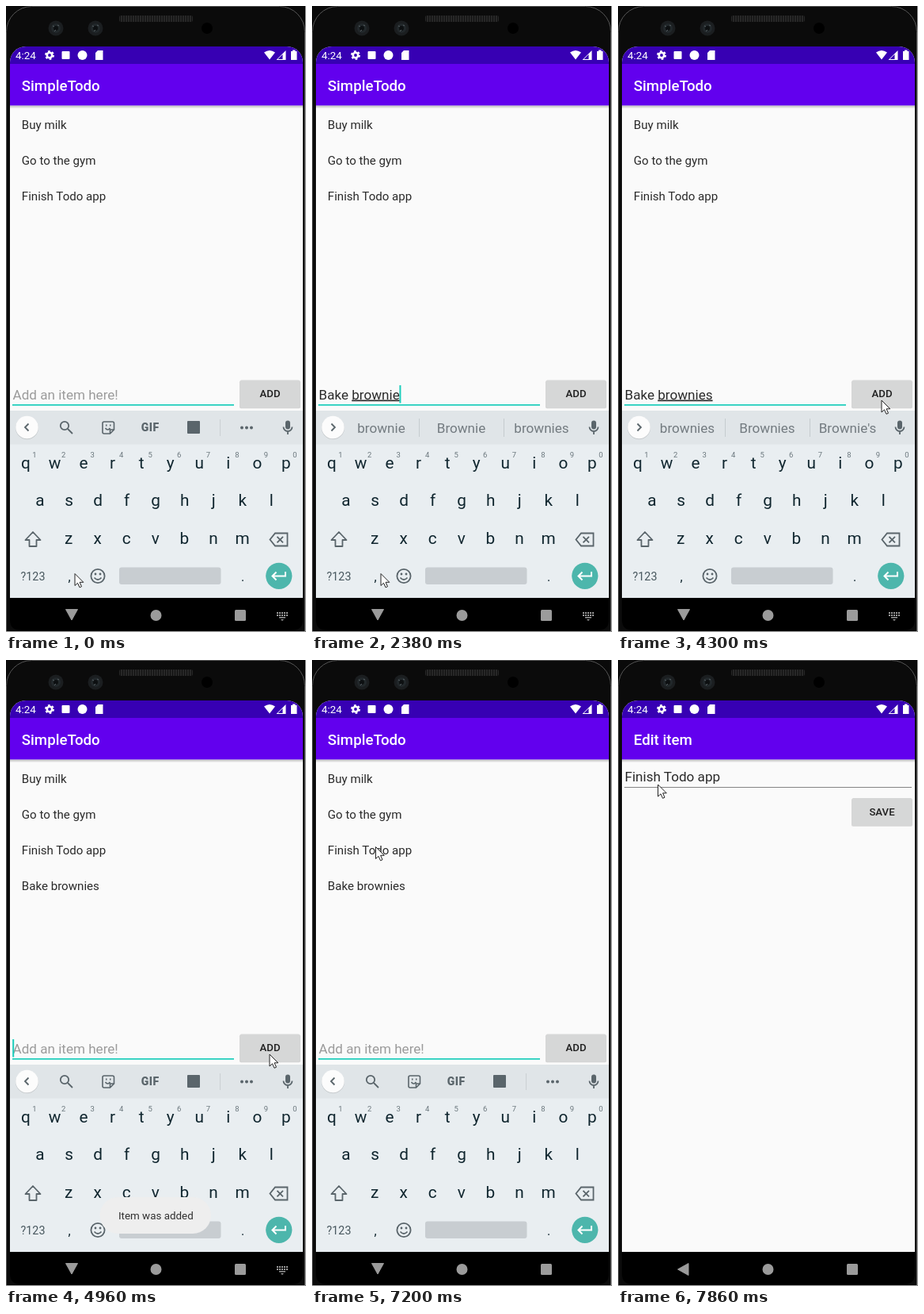
Recreate the animation shown at these times as an HTML page. Size 379 px wide and 789 px high, loop 8000 ms.

```html
<!DOCTYPE html>
<html lang="en">
<head>
<meta charset="utf-8">
<title>Todo app</title>
<style>
  html, body { margin: 0; width: 100%; height: 100%; overflow: hidden; background: #0a0a0a; }
  svg { display: block; width: 379px; height: 789px; font-family: Roboto, "Noto Sans", sans-serif; }
  text { white-space: pre; }
  .mid { text-anchor: middle; }
  .title { font-size: 18.7px; font-weight: 500; fill: #fff; }
  .row { font-size: 15.1px; fill: #2a2a2a; }
  .edit { font-size: 17.1px; fill: #2a2a2a; }
  .btn { font-size: 13.2px; font-weight: 500; fill: #202020; }
  .key { font-size: 20.8px; fill: #10262f; }
  .dot { font-size: 16px; fill: #10262f; }
  .num { font-size: 9.5px; fill: #6b777d; }
  .sug { font-size: 17.1px; fill: #737b80; }
  .sug.bold { font-weight: 700; fill: #101010; }
  .line { fill: none; stroke: #5a656b; stroke-width: 1.8; }
</style>
</head>
<body>
<svg viewBox="0 0 379 789">
  <defs>
    <clipPath id="screen"><path d="M5 746V71A20 20 0 0 1 25 51H355A20 20 0 0 1 375 71V746Z"/></clipPath>
    <linearGradient id="shade" x2="0" y2="1">
      <stop stop-color="#000" stop-opacity=".25"/><stop offset="1" stop-color="#000" stop-opacity="0"/>
    </linearGradient>
    <pattern id="mesh" width="3" height="3" patternUnits="userSpaceOnUse">
      <rect width="3" height="3" fill="#272727"/><rect width="1" height="3" fill="#111"/>
    </pattern>
    <g id="lens">
      <circle r="9.5" fill="#1b1e20"/><circle r="6" fill="#22282b"/>
      <circle r="3" fill="#0d1012"/><path d="M-4-3l2 1M2-4l2 1M-2 4l2-2" stroke="#596165"/>
    </g>
    <g id="bar">
      <rect x="5" y="125.4" width="370" height="4" fill="url(#shade)"/>
      <rect x="5" y="73" width="370" height="52.4" fill="#6200ee"/>
    </g>
    <g id="button">
      <rect x="295" y=".8" width="77" height="35" rx="2" fill="#000" opacity=".15"/>
      <rect x="295.5" width="76" height="34.5" rx="2" fill="#d6d7d7"/>
    </g>
  </defs>

  <!-- device -->
  <rect width="379" height="789" fill="#0a0a0a"/>
  <rect x=".5" y=".5" width="377" height="830" rx="32" fill="#0b0b0b" stroke="#555"/>
  <path d="M378.5 0V788.5H0" fill="none" stroke="#a8a8a8"/>
  <rect x="143" y="12" width="93" height="8" rx="2" fill="url(#mesh)"/>
  <use href="#lens" x="63" y="28"/><use href="#lens" x="113" y="28"/>
  <circle cx="254" cy="28" r="7" fill="#000"/>
  <path d="M5 745H375V774Q375 787 360 787H20Q5 787 5 774Z" fill="#000"/>

  <g clip-path="url(#screen)">
    <rect x="5" y="51" width="370" height="695" fill="#fafafa"/>

    <!-- list screen -->
    <use href="#bar"/>
    <text class="title" x="19.8" y="107">SimpleTodo</text>
    <g id="rows"></g>
    <text id="typed" class="edit" x="8.5" y="495.5"><tspan id="plain"></tspan><tspan id="word" text-decoration="underline"></tspan></text>
    <text id="hint" class="edit" x="8.5" y="495.5" style="fill:#9b9b9b">Add an item here!</text>
    <rect x="8" y="502" width="280" height="1.7" fill="#1bcdbb"/>
    <rect id="caret" y="478" width="2" height="22.5" fill="#1bcdbb"/>
    <use href="#button" y="471.5"/>
    <rect id="press" x="295.5" y="471.5" width="76" height="34.5" rx="2" fill="#000"/>
    <text class="btn mid" x="333.5" y="493.3">ADD</text>

    <!-- keyboard -->
    <rect x="5" y="510" width="370" height="236" fill="#e9eef1"/>
    <rect x="5" y="510" width="370" height="42.5" fill="#e0e5e8"/>
    <circle cx="26.5" cy="531.8" r="14.5" fill="#000" opacity=".12"/>
    <circle cx="26.5" cy="531" r="14.3" fill="#fcfcfc"/>
    <path id="chevron" class="line"/>
    <g id="tools">
      <g class="line">
        <circle cx="74" cy="529" r="5.2"/><path d="M78 533l6 6"/>
        <path d="M124 524h10.5q2 0 2 2v8l-5 5h-7.5q-2 0-2-2v-11q0-2 2-2zM131.5 539v-5h5M125.5 532q3 4 6 0" stroke-width="1.6"/>
      </g>
      <path d="M126 527.5h1.5v2H126zM131 527.5h1.5v2H131z" fill="#5a656b"/>
      <text class="mid" x="182.3" y="536" font-size="14" font-weight="900" letter-spacing=".5" fill="#5a656b">GIF</text>
      <rect x="229" y="523" width="16" height="16" rx="1" fill="#5a656b"/>
      <path d="M270.5 521V542" stroke="#cbd0d3"/>
      <g fill="#5a656b"><circle cx="298" cy="531.5" r="2"/><circle cx="304" cy="531.5" r="2"/><circle cx="310" cy="531.5" r="2"/></g>
    </g>
    <g id="sugs"><path d="M135.5 520V543M242.5 520V543" stroke="#c5cbce"/></g>
    <rect x="353" y="522.5" width="6" height="11" rx="3" fill="#5a656b"/>
    <path class="line" d="M350.5 530.5a5.5 5.5 0 0 0 11 0M356 536v4" stroke-width="1.6"/>
    <g id="keys"></g>
    <g class="line">
      <path d="M34 663L24.5 673h5v8h9v-8h5z" stroke-linejoin="round"/>
      <path d="M340 664.5h15.5v16H340l-6.5-8zM342.5 668.8l7.5 7.5M350 668.8l-7.5 7.5"/>
      <circle cx="116" cy="718.5" r="8.6"/><path d="M111.5 720.5q4.5 5 9 0"/>
    </g>
    <circle cx="113" cy="716" r="1.4" fill="#5a656b"/><circle cx="119" cy="716" r="1.4" fill="#5a656b"/>
    <text class="mid" x="34" y="723.5" font-size="14.3" fill="#47565d">?123</text>
    <rect x="143" y="707.5" width="128.5" height="21.5" rx="3" fill="#c8cdd1"/>
    <circle cx="344.8" cy="718.3" r="16.6" fill="#4db6ac"/>
    <path d="M353 713v5.5h-16M341.5 713.5l-5 5 5 5" fill="none" stroke="#fff" stroke-width="2"/>
    <g id="toast">
      <rect x="118.5" y="677" width="140.5" height="46" rx="23" fill="#eeeeee"/>
      <text class="mid" x="189.3" y="705" font-size="13.4" fill="#303030">Item was added</text>
    </g>

    <!-- edit screen -->
    <g id="editor">
      <rect x="5" y="73" width="370" height="673" fill="#fafafa"/>
      <use href="#bar"/>
      <text class="title" x="19.8" y="107">Edit item</text>
      <text class="edit" x="8.5" y="153">Finish Todo app</text>
      <path d="M8 160.5H371" stroke="#858585"/>
      <use href="#button" y="174"/>
      <text class="btn mid" x="333.5" y="196">SAVE</text>
    </g>

    <!-- status bar -->
    <rect x="5" y="51" width="370" height="22" fill="#3700b3"/>
    <g fill="#fff">
      <text x="12" y="67" font-size="13.4">4:24</text>
      <rect x="70.5" y="57" width="10" height="10" rx="1"/>
      <circle cx="96.5" cy="62" r="6"/>
      <path d="M116 56h6.5v12h-9.5v-9zM326 58.5q7-5 14 0l-7 9zM341.5 68h12V56zM360 57h2v-1.5h3.5V57h2v11H360z"/>
      <path d="M349.5 61v6h-6z" fill="#3700b3"/>
    </g>
    <circle cx="55" cy="62" r="3.2" fill="none" stroke="#fff" stroke-width="2.6"/>
    <circle cx="55" cy="62" r="5" fill="none" stroke="#fff" stroke-width="2" stroke-dasharray="2.618"/>
  </g>

  <!-- navigation -->
  <g fill="#9b9b9b">
    <path id="back" d="M75.5 760.5H90.5L83 774Z" stroke="#9b9b9b" stroke-linejoin="round"/>
    <circle cx="189.5" cy="768" r="7"/>
    <rect x="289" y="761" width="14" height="14" rx="1.5"/>
    <path id="switcher" d="M342 764h2v2h-2zm3 0h2v2h-2zm3 0h2v2h-2zm3 0h2v2h-2zm3 0h2v2h-2zM342 767h2v2h-2zm3 0h2v2h-2zm3 0h2v2h-2zm3 0h2v2h-2zm3 0h2v2h-2zM345 770h8v1.5h-8zM347 773h4l-2 2z"/>
  </g>

  <path id="mouse" d="M0 0V15L3.5 11.8 6 17.3 8.5 16.2 6.1 10.8H10.8Z" fill="#fff" stroke="#222" stroke-linejoin="round"/>
</svg>

<script>
const LOOP = 8000;
const $ = id => document.getElementById(id);

function addText(parent, cls, x, y, str) {
  const el = document.createElementNS('http://www.w3.org/2000/svg', 'text');
  el.setAttribute('class', cls);
  el.setAttribute('x', x);
  el.setAttribute('y', y);
  el.textContent = str;
  return parent.appendChild(el);
}

const rows = ['Buy milk', 'Go to the gym', 'Finish Todo app', 'Bake brownies']
  .map((s, i) => addText($('rows'), 'row', 19.8, 154.5 + i * 45.2, s));

[['qwertyuiop', 25, 582.5], ['asdfghjkl', 43, 629.8], ['zxcvbnm', 79.2, 677.6]].forEach(([letters, x, y], r) =>
  [...letters].forEach((c, i) => {
    const kx = x + i * 36.55;
    addText($('keys'), 'key mid', kx, y, c);
    if (!r) addText($('keys'), 'num mid', kx + 11, 568.5, (i + 1) % 10);
  }));
addText($('keys'), 'dot mid', 80, 724.5, ',');
addText($('keys'), 'dot mid', 299, 724.5, '.');

const sugs = [87.5, 188.5, 290].map(x => addText($('sugs'), 'sug mid', x, 538, ''));

// time, typed text, suggestions (* marks the autocorrect choice)
const typing = [
  [0, '', ''],
  [250, 'B', 'B|But|Be'],
  [620, 'Ba', 'Ba|Back|Bad'],
  [784, 'Bak', 'Bak|*Bake|Baker'],
  [948, 'Bake', 'Bake|Baked|Baker'],
  [1112, 'Bake ', 'the|a|and'],
  [1276, 'Bake b', 'b|by|be'],
  [1440, 'Bake br', 'br|*bread|be'],
  [1690, 'Bake bro', 'bro|*bread|brownies'],
  [1825, 'Bake brow', 'brow|*brown|brownies'],
  [1960, 'Bake brown', 'brown|Brown|brownies'],
  [2260, 'Bake browni', 'browni|*brownie|brownies'],
  [2380, 'Bake brownie', 'brownie|Brownie|brownies'],
  [2820, 'Bake brownies', "brownies|Brownies|Brownie's"],
  [4420, '', '']
];
const blink = [[0, 0], [250, 1], [3220, 0], [3768, 1], [4300, 0], [4420, 1], [4965, 0],
  [5380, 1], [5911, 0], [6460, 1], [7200, 0]];
const toast = [[0, 0], [4566, .5], [4700, 1], [6460, .5], [6580, 0]];
const press = [[0, 0], [4420, .14], [4566, .08], [4700, 0]];
// time, opacity, scale of the opening screen
const editor = [[0, 0, 1], [7350, 1, .97], [7480, 1, 1]];
const mouse = [
  [0, 87, 715.5], [3220, 98, 712], [3357, 150, 690], [3494, 225, 640], [3631, 300, 580],
  [3768, 355, 535], [3906, 367, 512], [4043, 348, 502], [4180, 333, 497],
  [4965, 326, 488], [5097, 308, 466], [5230, 282, 436], [5380, 240, 388], [5513, 195, 340],
  [5646, 152, 300], [5778, 118, 270], [5911, 96, 252], [6044, 86, 245], [6160, 82, 242],
  [6310, 81, 237], [6460, 80.5, 235.5], [7480, 74, 215], [7610, 64, 188], [7740, 55, 167], [7860, 50.5, 157]
];

const at = (steps, t) => steps.findLast(s => s[0] <= t);
const fade = (id, v) => $(id).setAttribute('opacity', v);

function showTyping(t) {
  const [, str, choices] = at(typing, t);
  const cut = str.lastIndexOf(' ') + 1;
  $('plain').textContent = str.slice(0, cut);
  $('word').textContent = str.slice(cut);
  fade('hint', str ? 0 : 1);
  fade('tools', str ? 0 : 1);
  fade('sugs', str ? 1 : 0);
  $('chevron').setAttribute('d', str ? 'M24.5 526.5l4.5 4.5-4.5 4.5' : 'M28.5 526.5l-4.5 4.5 4.5 4.5');
  const words = choices.split('|');
  sugs.forEach((el, i) => {
    const w = words[i] || '';
    el.textContent = w.replace('*', '');
    el.classList.toggle('bold', w[0] === '*');
  });
  $('caret').setAttribute('x', 8.2 + (str ? $('typed').getComputedTextLength() : 0));
  fade('caret', at(blink, t)[1]);
}

function render(t) {
  showTyping(t);
  rows[3].setAttribute('opacity', t < 4420 ? 0 : 1);
  fade('toast', at(toast, t)[1]);
  fade('press', at(press, t)[1]);
  const [, open, scale] = at(editor, t);
  fade('editor', open);
  $('editor').setAttribute('transform', `translate(190 420) scale(${scale}) translate(-190 -420)`);
  $('back').setAttribute('transform', open ? 'rotate(90 82.25 767.25)' : '');
  fade('switcher', t < 7200 ? 1 : 0);
  const [, x, y] = at(mouse, t);
  $('mouse').setAttribute('transform', `translate(${x} ${y})`);
}

function tick() {
  render(performance.now() % LOOP);
  requestAnimationFrame(tick);
}
tick();
</script>
</body>
</html>
```
